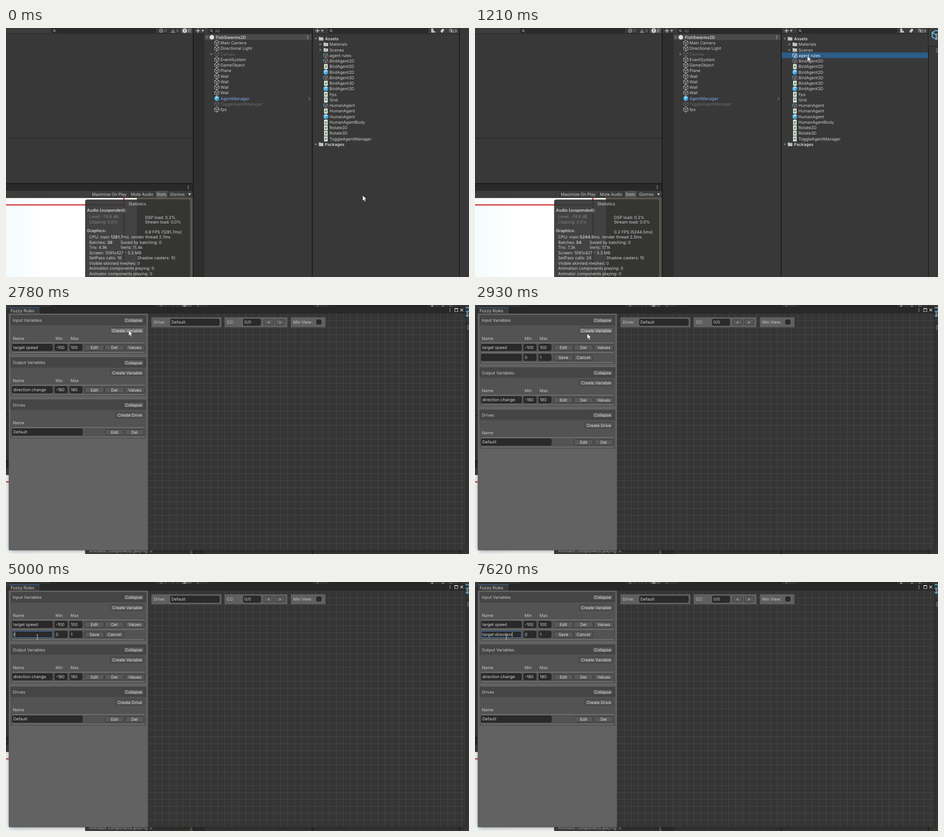
Animation of 1019 by 549 pixels, one loop 8000 ms. Source, as an HTML page with a canvas:

```html
<!DOCTYPE html>
<html lang="en">
<head>
<meta charset="utf-8">
<title>Rule editor</title>
<style>
html, body { margin: 0; width: 100%; height: 100%; overflow: hidden; background: #383838; }
canvas { display: block; width: 1019px; height: 549px; }
</style>
</head>
<body>
<canvas id="stage" width="1019" height="549"></canvas>
<script>
const ctx = document.getElementById('stage').getContext('2d');
ctx.textRendering = 'geometricPrecision';
const LOOP = 8000, SELECT = 1210, OPEN = 1330, ADD = 2930, BEAM = 3910, FOCUS = 4060;
const TEXT = '#cbcbcb', DIM = '#6c6c6c';

// [time, x, y] of the pointer tip
const POINTER = [
  [0, 785, 369], [280, 779, 369], [430, 773, 318], [550, 748, 165], [670, 734, 76],
  [820, 733, 70], [940, 732, 64], [1060, 731.5, 61.5], [1760, 679, 102],
  [1910, 612, 140], [2030, 500, 164], [2150, 400, 156], [2270, 330, 128], [2390, 293, 105],
  [2540, 281, 84], [2660, 272, 62], [2780, 270, 56], [2930, 247, 63],
  [3080, 142, 102], [3200, 68, 123], [3600, 67.5, 123]
];
// [time, letters typed]
const TYPING = [
  [0, 0], [5000, 1], [5120, 2], [5240, 3], [5390, 4], [5540, 5], [5690, 6], [5810, 7],
  [6370, 8], [6650, 10], [6800, 11], [6950, 12], [7230, 13], [7380, 14], [7500, 15], [7620, 16]
];
const latest = (keys, t) => keys.filter(k => k[0] <= t).pop();

function rect(x, y, w, h, color) {
  ctx.fillStyle = color;
  ctx.fillRect(x, y, w, h);
}
function box(x, y, w, h, fill, edge, r = 2) {
  ctx.beginPath();
  ctx.roundRect(x + .5, y + .5, w - 1, h - 1, r);
  ctx.fillStyle = fill;
  ctx.fill();
  if (edge) { ctx.strokeStyle = edge; ctx.lineWidth = 1; ctx.stroke(); }
}
function path(points, color, fill, width = 1) {
  ctx.beginPath();
  points.forEach(([x, y], i) => i ? ctx.lineTo(x, y) : ctx.moveTo(x, y));
  if (fill) { ctx.closePath(); ctx.fillStyle = color; ctx.fill(); }
  else { ctx.strokeStyle = color; ctx.lineWidth = width; ctx.stroke(); }
}
function dot(x, y, r, color) {
  ctx.beginPath();
  ctx.arc(x, y, r, 0, 7);
  ctx.fillStyle = color;
  ctx.fill();
}
function setFont(bold, size = 9.1) {
  ctx.font = `${bold ? 600 : 400} ${size}px Inter, "Liberation Sans", sans-serif`;
}
// y is the middle of the capitals
function text(s, x, y, color = TEXT, bold = false, align = 'left', size = 9.1) {
  setFont(bold, size);
  ctx.textAlign = align;
  ctx.fillStyle = color;
  ctx.fillText(s, x, y + size * .36);
  return ctx.measureText(s).width;
}
// parts between stars are bold
function rich(s, x, y) {
  s.split('*').forEach((part, i) => { x += text(part, x, y, '#d2d2d2', i % 2 === 1); });
}

function cube(x, y, r, color, faces) {
  const c = r * .87, h = r / 2;
  const hex = [[x, y - r], [x + c, y - h], [x + c, y + h], [x, y + r], [x - c, y + h], [x - c, y - h], [x, y - r]];
  if (faces) {
    path(hex, '#58b8ec', true);
    path([[x, y - r], [x + c, y - h], [x, y], [x - c, y - h]], '#96dcff', true);
    path([[x, y], [x + c, y - h], [x + c, y + h], [x, y + r]], '#3a9fd8', true);
    return;
  }
  const w = r > 8 ? 2 : 1;
  path(hex, color, false, w);
  path([[x - c, y - h], [x, y], [x + c, y - h]], color, false, w);
  path([[x, y], [x, y + r]], color, false, w);
}
function arrow(x, y, open, color = '#747474') {
  path(open ? [[x - 3, y - 2], [x + 3, y - 2], [x, y + 3]] : [[x - 2, y - 3], [x + 3, y], [x - 2, y + 3]], color, true);
}
function lens(x, y) {
  ctx.beginPath();
  ctx.arc(x, y, 2, 0, 7);
  ctx.strokeStyle = '#bdbdbd';
  ctx.lineWidth = 1;
  ctx.stroke();
  path([[x + 1.5, y + 1.5], [x + 4, y + 4]], '#bdbdbd');
}
function kebab(x, y) {
  for (let i = -1; i < 2; i++) rect(x - .7, y + i * 3 - .7, 1.6, 1.6, '#c4c4c4');
}
function plus(x, y) {
  rect(x - 4, y - .7, 9, 1.5, TEXT);
  rect(x - .2, y - 4.5, 1.5, 9, TEXT);
  arrow(x + 11, y, true, '#b0b0b0');
}
const icons = {
  folder(x, y) {
    rect(x - 5, y - 4, 4, 2, '#c2c2c2');
    rect(x - 5, y - 3, 10, 7, '#c2c2c2');
  },
  script(x, y) {
    rect(x - 4, y - 5.5, 8, 11, '#e4e8e2');
    text('#', x, y, '#2f7d3c', true, 'center', 8);
  },
  prefab(x, y) { cube(x, y, 5.8, '', true); },
  asset(x, y, lit) {
    cube(x - .5, y - .5, 5.2, lit ? '#e6eef4' : '#66a9c9');
    rect(x + .5, y, 5, 6, lit ? '#2c5d87' : '#383838');
    text('{}', x + 3, y + 2, lit ? '#ffffff' : '#e2653a', true, 'center', 7);
  }
};

function consolePanel() {
  rect(0, 0, 411, 12, '#3c3c3c');
  rect(0, 12, 411, 1, '#232323');
  box(100, -4, 230, 15, '#2a2a2a', '#212121', 3);
  lens(106, 5.5);
  rect(333, 0, 25, 12, '#353535');
  rect(359, 0, 25, 12, '#353535');
  rect(385, 0, 25, 12, '#505050');
  dot(341.5, 6, 5, '#777');
  path([[367.5, 1], [373, 11], [362, 11]], '#777', true);
  dot(393.5, 6, 5, '#d0d0d0');
  [341.5, 367.5, 393.5].forEach((x, i) => {
    text('!', x, 6, '#333', true, 'center', 8);
    text('0', x + 7, 6, i < 2 ? '#8f8f8f' : TEXT);
  });
  rect(0, 243, 411, 1, '#202020');
}

function gamePanel(live) {
  rect(0, 342, 411, 3, '#1b1b1b');
  rect(0, 344, 411, 15, '#292929');
  kebab(401, 351);
  rect(0, 359, 411, 15, '#3c3c3c');
  rect(330, 359, 25, 15, '#505050');
  [187, 271, 327, 357].forEach(x => rect(x, 359, 1, 15, '#2d2d2d'));
  text('Maximize On Play', 189, 366.5);
  text('Mute Audio', 275, 366.5);
  text('Stats', 331, 366.5);
  text('Gizmos', 361, 366.5);
  arrow(404, 366.5, true, TEXT);

  rect(0, 374, 411, 175, '#5a554c');
  const floor = ctx.createLinearGradient(0, 0, 175, 0);
  floor.addColorStop(0, '#f4fcfd');
  floor.addColorStop(.5, '#ffffff');
  rect(0, 375, 288, 174, floor);
  rect(0, 388.5, 260, 3, '#d2464a');
  rect(258, 375, 3, 174, '#d2464a');

  ctx.beginPath();
  ctx.roundRect(174.5, 378.5, 230, 190, 4);
  ctx.fillStyle = 'rgba(50,50,50,.92)';
  ctx.fill();
  ctx.strokeStyle = 'rgba(30,30,30,.55)';
  ctx.lineWidth = 1;
  ctx.stroke();

  const v = live
    ? ['0.2 FPS (5244.5ms)', '*5244.5*ms  render thread 2.3ms', 54, '7.3k', '17.1k', 24, 15]
    : ['0.8 FPS (1281.7ms)', '*1281.7*ms  render thread 2.7ms', 36, '4.9k', '11.4k', 16, 10];
  text('Statistics', 289, 388, '#d2d2d2', false, 'center');
  text('Audio (suspended):', 178, 402, '#d2d2d2', true);
  text('Level: -74.8 dB', 183, 415.5, '#858585');
  text('Clipping: 0.0%', 183, 427.5, '#858585');
  rich('DSP load: 0.2%', 306, 418);
  rich('Stream load: 0.0%', 306, 428);
  text('Graphics:', 178, 447, '#d2d2d2', true);
  rich(v[0], 306, 449.5);
  const lines = [`CPU: main ${v[1]}`, `Batches: *${v[2]}*`, `Tris: ${v[3]}`, 'Screen: 1091x427 - 5.3 MB',
    `SetPass calls: ${v[5]}`, 'Visible skinned meshes: 0', 'Animation components playing: 0', 'Animator components playing: 0'];
  lines.forEach((s, i) => rich(s, 183, 461 + i * 11.5));
  rich('Saved by batching: 0', 252, 472.5);
  rich(`Verts: ${v[4]}`, 252, 484);
  rich(`Shadow casters: ${v[6]}`, 289, 507);
}

function hierarchy() {
  rect(411, 0, 2, 549, '#191919');
  rect(413, 0, 260, 12, '#3c3c3c');
  rect(413, 12, 260, 1, '#232323');
  rect(413, 13, 24, 536, '#2e2e2e');
  plus(422, 6);
  box(446, -4, 226, 15, '#2a2a2a', '#212121', 3);
  lens(451.5, 5.5);
  text('All', 460, 6.5, '#858585');
  rect(437, 14, 236, 12.5, '#4a4a4a');
  arrow(442, 20.5, true);
  dot(453, 20.5, 5, '#e0e0e0');
  text('FishSwarms2D', 462, 20.5, '#d6d6d6', true);
  kebab(664, 20.5);
  const names = ['Main Camera', 'Directional Light', 'Canvas', 'EventSystem', 'GameObject', 'Plane',
    'Wall', 'Wall', 'Wall', 'Wall', 'AgentManager', 'ToggleAgentManager', 'fps'];
  names.forEach((name, i) => {
    const y = 32.8 + i * 12.26, off = i === 2 || i === 11, blue = i === 10;
    cube(464, y, 5.6, off ? DIM : '#c6c6c6', blue);
    text(name, 472, y, off ? DIM : blue ? '#7fa9ee' : TEXT);
  });
  arrow(452, 57.4, false);
  path([[666, 152], [669.5, 155.5], [666, 159]], '#a0a0a0');
}

function project(selected) {
  rect(673, 0, 2, 549, '#191919');
  rect(675, 0, 322, 12, '#3c3c3c');
  rect(675, 12, 322, 1, '#232323');
  plus(685, 6);
  box(709, -4, 220, 15, '#2a2a2a', '#212121', 3);
  lens(715, 5.5);
  dot(938, 3.5, 2.5, TEXT);
  rect(936, 6, 4, 4, TEXT);
  path([[941, 4], [945, 10], [940, 10]], TEXT, true);
  path([[956, 7], [960, 2], [964, 2], [964, 6], [959, 11]], TEXT, true);
  ctx.beginPath();
  ctx.ellipse(980.5, 6, 5, 3, 0, 0, 7);
  ctx.strokeStyle = TEXT;
  ctx.lineWidth = 1;
  ctx.stroke();
  dot(980.5, 6, 1.5, TEXT);
  path([[976, 1], [985, 11]], TEXT);
  text('9', 987, 6.5);

  if (selected) rect(675, 54, 322, 12.5, '#2c5d87');
  const rows = ['folder Materials', 'folder Scenes', 'asset agent rules',
    'asset BirdAgent2D', 'script BirdAgent2D', 'prefab BirdAgent2D',
    'asset BirdAgent3D', 'script BirdAgent3D', 'prefab BirdAgent3D', 'script Fps', 'script Grid',
    'asset HumanAgent', 'script HumanAgent', 'prefab HumanAgent', 'script HumanAgentBody',
    'script Rotate2D', 'script Rotate3D', 'script ToggleAgentManager'];
  rows.forEach((row, i) => {
    const y = 36 + i * 12.26, cut = row.indexOf(' '), lit = selected && i === 2;
    icons[row.slice(0, cut)](704, y, lit);
    text(row.slice(cut + 1), 712, y, lit ? '#f0f0f0' : TEXT);
    if (i < 2) arrow(692, y, false);
  });
  [['Assets', 23.6], ['Packages', 256.5]].forEach(([name, y], i) => {
    arrow(682, y, !i);
    icons.folder(693.5, y);
    text(name, 702, y, '#d6d6d6', true);
  });

  rect(997, 0, 1.5, 549, '#191919');
  if (selected) {
    rect(998, 0, 21, 39, '#3c3c3c');
    rect(998, 39, 21, 1, '#232323');
    cube(1015, 15, 10, '#6cc8ee');
    text('{', 1016, 20, '#e2653a', true, 'left', 10);
    box(1013, 43, 20, 13, '#5a5a5a', '#303030');
  }
}

function button(label, x, y, w, hover) {
  box(x, y, w, 13, hover ? '#6a6a6a' : '#585858', '#343434');
  text(label, x + w / 2, y + 6.6, '#e2e2e2', false, 'center');
}
function field(value, x, y, w, edge = '#1c1c1c') {
  box(x, y, w, 15, '#2a2a2a', edge);
  text(value, x + 2.5, y + 7.3, '#d2d2d2');
}
const rule = y => rect(14, y, 291, 1, '#8b8b8b');

function card(y, h, title, create, bw, hover) {
  rect(10, y, 299, h, '#535353');
  rect(10, y, 299, 23, '#454545');
  text(title, 15, y + 12);
  button('Collapse', 258, y + 5.5, 46);
  button(create, 304 - bw, y + 28, bw, hover);
  text('Name', 15, y + 51.5);
  rule(y + 61);
}
function variables(y, title, name, range, draft, hover) {
  card(y, draft ? 108.2 : 86, title, 'Create Variable', 75, hover);
  text('Min', 109, y + 51.5);
  text('Max', 142, y + 51.5);
  field(name, 13.5, y + 64, 89);
  field('-' + range, 107, y + 64, 28);
  field(range, 140, y + 64, 28);
  button('Edit', 173, y + 65.5, 43);
  button('Del', 217, y + 65.5, 43);
  button('Values', 262, y + 65.5, 43);
  rule(y + 82);
  if (draft) {
    field(draft.name, 13.5, y + 86, 89, draft.edge);
    if (draft.caret) {
      setFont(false);
      rect(16 + ctx.measureText(draft.name).width, y + 88, 1, 11, '#d8d8d8');
    }
    field('0', 107, y + 86, 28);
    field('1', 140, y + 86, 28);
    button('Save', 173, y + 87.5, 43);
    button('Cancel', 217, y + 87.5, 43);
    rule(y + 104.2);
  }
}

function rulesWindow(t) {
  ctx.save();
  ctx.shadowColor = 'rgba(0,0,0,.42)';
  ctx.shadowBlur = 12;
  ctx.shadowOffsetY = 2;
  box(6, 3, 1006, 538, '#282828', null, 4);
  ctx.restore();
  rect(7, 6, 67, 14, '#3c3c3c');
  rect(7, 5, 67, 1, '#3a72b0');
  text('Fuzzy Rules', 10.5, 13);
  kebab(977, 11);
  ctx.strokeStyle = TEXT;
  ctx.lineWidth = 1;
  ctx.strokeRect(987.5, 7.5, 7, 7);
  rect(987, 7, 8, 2, TEXT);
  path([[1000, 8], [1006, 14]], TEXT, false, 1.4);
  path([[1006, 8], [1000, 14]], TEXT, false, 1.4);

  rect(313, 19, 698, 521.5, '#353535');
  const cell = 15.33;
  for (let x = 312.6 + cell; x < 1011; x += cell) rect(x, 19, 1, 521.5, '#484848');
  for (let y = 19 + cell; y < 540; y += cell) rect(313, y, 698, 1, '#484848');

  [[320, 154], [481, 138], [627, 76]].forEach(([x, w]) => rect(x, 27, w, 22, '#5f5f5f'));
  text('Drive:', 325, 38);
  field('Default', 361.5, 30.5, 108.5);
  text('CC:', 486, 38);
  field('0/0', 522, 30.5, 39);
  button('<', 567, 31.5, 22);
  button('>', 592, 31.5, 22);
  text('Min View:', 632, 38);
  box(683, 32, 11, 11, '#2a2a2a', '#1c1c1c');

  rect(6, 19, 306.5, 521.5, '#626262');
  const added = t >= ADD, shift = added ? 22.2 : 0;
  const draft = added && {
    name: 'target direction'.slice(0, latest(TYPING, t)[1]),
    edge: t >= FOCUS ? '#3a79bb' : t >= BEAM ? '#686868' : '#1c1c1c',
    caret: t >= FOCUS
  };
  variables(22, 'Input Variables', 'target speed', '100', draft, t >= 2660 && t < 3080);
  variables(115.2 + shift, 'Output Variables', 'direction change', '180');
  const y = 208.5 + shift;
  card(y, 86, 'Drives', 'Create Drive', 63);
  field('Default', 13.5, y + 64, 155);
  button('Edit', 218, y + 65.5, 42);
  button('Del', 262, y + 65.5, 42);
  rule(y + 82);
}

function pointer(t) {
  if (t >= BEAM) {
    rect(68.5, 116.5, 1, 10, '#d8d8d8');
    rect(67, 116, 4, 1, '#b8b8b8');
    rect(67, 126, 4, 1, '#b8b8b8');
    return;
  }
  const [, x, y] = latest(POINTER, t);
  const shape = [[0, 0], [0, 12], [2.7, 9.5], [4.7, 14], [6.7, 13], [4.7, 8.7], [8.5, 8.5]].map(p => [x + p[0], y + p[1]]);
  path(shape, '#ffffff', true);
  path([...shape, shape[0]], 'rgba(20,20,20,.75)', false, .7);
}

function draw(t) {
  rect(0, 0, 1019, 549, '#383838');
  const selected = t >= SELECT;
  consolePanel();
  gamePanel(selected);
  hierarchy();
  project(selected);
  if (t >= OPEN) rulesWindow(t);
  pointer(t);
}

const start = performance.now();
function tick() {
  draw((performance.now() - start) % LOOP);
  requestAnimationFrame(tick);
}
tick();
</script>
</body>
</html>
```
